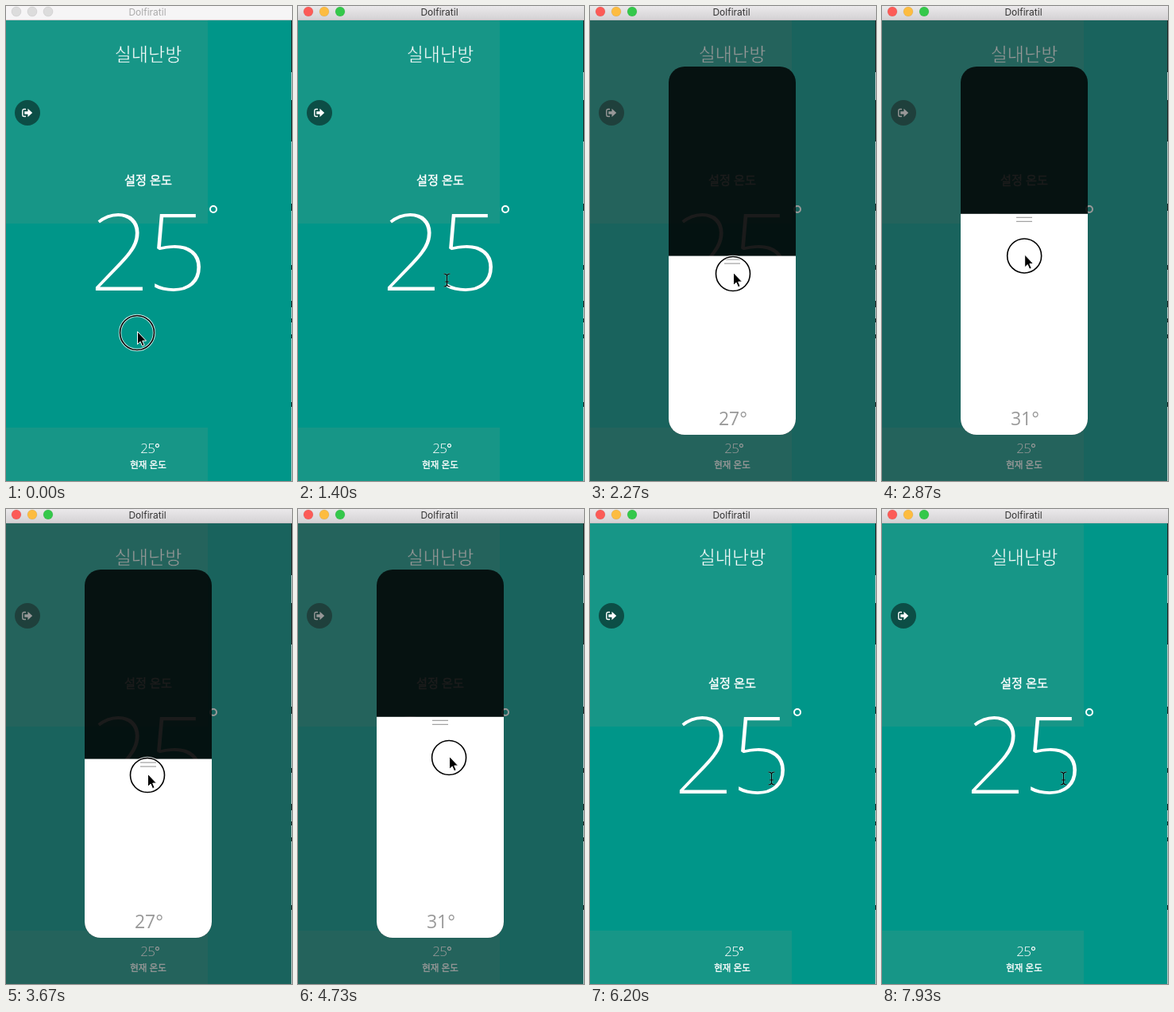
Write an HTML page that moves like this. It is 360 px wide and 596 px high and loops after 8 s.

```html
<!DOCTYPE html>
<html lang="ko">
<head>
<meta charset="utf-8">
<title>실내난방</title>
<style>
  html, body { margin: 0; height: 100%; overflow: hidden; background: #009688; }
  svg { display: block; width: 100vw; height: 100vh; }
  text { text-anchor: middle; cursor: default; user-select: none; }
  .hangul { font-family: "Noto Sans CJK KR", "Noto Sans CJK JP", "Noto Sans CJK", sans-serif; }
  .digits { font-family: "Open Sans", "Noto Sans", sans-serif; }
  .tight { letter-spacing: -.044em; }
  .title { font: 12px Inter, Roboto, sans-serif; }
</style>
</head>
<body>
<svg viewBox="0 0 360 596">
  <defs>
    <linearGradient id="bar" x2="0" y2="1">
      <stop stop-color="#ebe9eb"/><stop offset="1" stop-color="#d3d1d3"/>
    </linearGradient>
    <clipPath id="capsule"><rect x="99" y="76" width="160" height="462" rx="20"/></clipPath>
    <!-- A black outline over white letters makes them thinner. -->
    <mask id="thin" maskUnits="userSpaceOnUse" x="0" y="0" width="360" height="596">
      <g fill="#fff" stroke="#000">
        <text class="hangul" x="179" y="69" font-size="23" stroke-width=".5">실내난방</text>
        <text class="digits tight" x="176.5" y="357.8" font-size="137" font-weight="300" stroke-width="2.2">25</text>
      </g>
    </mask>
    <path id="stem" d="M-4-8q4 0 4 3V5q0 3-4 3M4-8q-4 0-4 3M0 5q0 3 4 3M-2.5 2h5"/>
    <circle id="halo" cy="1" r="21.5"/>
  </defs>

  <rect width="360" height="596" fill="#009689"/>
  <g fill="#ff8c75" fill-opacity=".09">
    <g id="patches">
      <rect y="18" width="254" height="255"/>
      <rect y="529" width="254" height="67"/>
    </g>
    <rect id="wash" y="18" width="360" height="578"/>
  </g>

  <g fill="#fff">
    <rect width="360" height="596" mask="url(#thin)"/>
    <g class="hangul" font-weight="500" stroke="#fff" stroke-width=".35">
      <text x="179" y="223.8" font-size="15.2">설정 온도</text>
      <text x="179" y="580.3" font-size="11.5">현재 온도</text>
    </g>
    <circle cx="261" cy="255" r="4" fill="none" stroke="#fff" stroke-width="2"/>
    <text class="digits tight" x="181.2" y="561" font-size="17" font-weight="300">25<tspan font-size="16" font-weight="600">°</tspan></text>
    <circle cx="27" cy="134" r="16" fill="#000" fill-opacity=".48"/>
    <path d="M25 129.5h-2.5q-1.7 0-1.7 1.8v5.4q0 1.8 1.7 1.8h2.5" fill="none" stroke="#fff" stroke-width="1.4"/>
    <path d="M23.3 132.2h4.2v-3.4l5.7 5.2-5.7 5.2v-3.4h-4.2z"/>
  </g>

  <rect id="dim" y="18" width="360" height="578" fill="#323232" fill-opacity=".5"/>
  <g clip-path="url(#capsule)">
    <rect id="well" x="99" y="76" width="160" height="462" fill-opacity=".82"/>
    <g id="level">
      <rect x="99" width="160" height="470" fill="#fff"/>
      <path d="M169 4.5h20M169 9.5h20" stroke="#8d8d8d"/>
    </g>
    <text id="value" class="digits" x="180" y="526" font-size="23" fill="#999"></text>
  </g>

  <rect x="359" y="18" width="1" height="578" fill="#b9c9c7"/>
  <path d="M359.5 18v65m0 35v52m0 78v9m0 68v6m0 39v8m0 14v5m0 15v5m0 80v6" stroke="#1c2322"/>

  <rect id="titlebar" width="360" height="18"/>
  <path d="M0 17.5H360" stroke="#bcbabc" stroke-opacity=".7"/>
  <g stroke="#000" stroke-opacity=".12" stroke-width=".6">
    <circle class="light" cx="13" cy="7" r="6"/>
    <circle class="light" cx="33" cy="7" r="6"/>
    <circle class="light" cx="53" cy="7" r="6"/>
  </g>
  <text id="caption" class="title" x="178" y="11.5">Dolfiratil</text>

  <g id="pointer">
    <g id="ring" fill="none">
      <use href="#halo" stroke="#fff" stroke-opacity=".8" stroke-width="3.4"/>
      <use href="#halo" stroke="#000" stroke-width="1.6"/>
    </g>
    <path id="arrow" d="M.5-.5V15.5l3.6-3.4 2.4 5.6 2.6-1.1-2.4-5.5h4.8z" stroke="#fff" stroke-width="1"/>
    <g id="beam" fill="none" transform="translate(.5 0)">
      <use href="#stem" stroke="#fff" stroke-opacity=".35" stroke-width="2.2"/>
      <use href="#stem" stroke="#000" stroke-width="1.1"/>
    </g>
  </g>
</svg>
<script>
const LOOP = 8000, PRESS = 1430, RELEASE = 5340;
const START_Y = 344, START_VALUE = 25, PIXELS_PER_DEGREE = 5.5;
const MIN_VALUE = 10, BOTTOM = 538, DEGREE_HEIGHT = 13.2;

// Pointer positions: [time, x, y]
const route = [
  [0, 165, 409], [300, 165, 409], [1250, 187, 344], [1430, 187, 344],
  [1600, 190, 278], [1800, 190, 272], [2270, 180, 335], [2500, 180, 335],
  [3000, 179, 308], [3450, 178, 333], [3750, 178, 333], [4400, 182, 296],
  [5000, 196, 322], [5340, 208, 322], [5460, 228, 336], [6100, 228, 338],
  [8000, 228, 338]
];

const $ = id => document.getElementById(id);
const lights = document.querySelectorAll('.light');
const clamp = v => Math.max(0, Math.min(1, v));
const between = (t, a, b) => t >= a && t < b;
const show = (id, visible) => $(id).style.display = visible ? '' : 'none';

function pointerAt(t) {
  const i = Math.max(1, route.findIndex(k => k[0] >= t));
  const [t0, x0, y0] = route[i - 1], [t1, x1, y1] = route[i];
  const u = clamp((t - t0) / (t1 - t0)), s = u * u * (3 - 2 * u);
  return [x0 + (x1 - x0) * s, y0 + (y1 - y0) * s];
}

function draw(t) {
  const [x, y] = pointerAt(t);
  const dragging = between(t, PRESS, RELEASE);
  const dragY = pointerAt(Math.max(PRESS, Math.min(t, RELEASE)))[1];
  const value = Math.round(START_VALUE + (START_Y - dragY) / PIXELS_PER_DEGREE);
  const fade = Math.min(clamp((t - 1444) / 200), clamp((5633 - t) / 233));

  for (const id of ['dim', 'well', 'level', 'value']) $(id).setAttribute('opacity', fade);
  $('level').setAttribute('transform',
    `translate(0 ${BOTTOM - (value - MIN_VALUE) * DEGREE_HEIGHT})`);
  $('value').textContent = value + '°';

  const washed = between(t, PRESS, 1700);
  show('wash', washed);
  show('patches', !washed);

  const active = t >= 140;
  $('titlebar').setAttribute('fill', active ? 'url(#bar)' : '#f6f5f6');
  $('caption').setAttribute('fill', active ? '#333' : '#aaa');
  ['#fc5b57', '#fdbc40', '#34c84a'].forEach((color, i) =>
    lights[i].setAttribute('fill', active ? color : '#dcdcdc'));

  const overDigits = fade === 0 && !dragging &&
    between(x, 113, 246) && between(y, 240, 385);
  show('beam', overDigits);
  show('arrow', !overDigits);
  show('ring', !active || dragging);
  $('pointer').setAttribute('transform', `translate(${x} ${y})`);
}

function tick() {
  draw(performance.now() % LOOP);
  requestAnimationFrame(tick);
}
tick();
</script>
</body>
</html>
```
